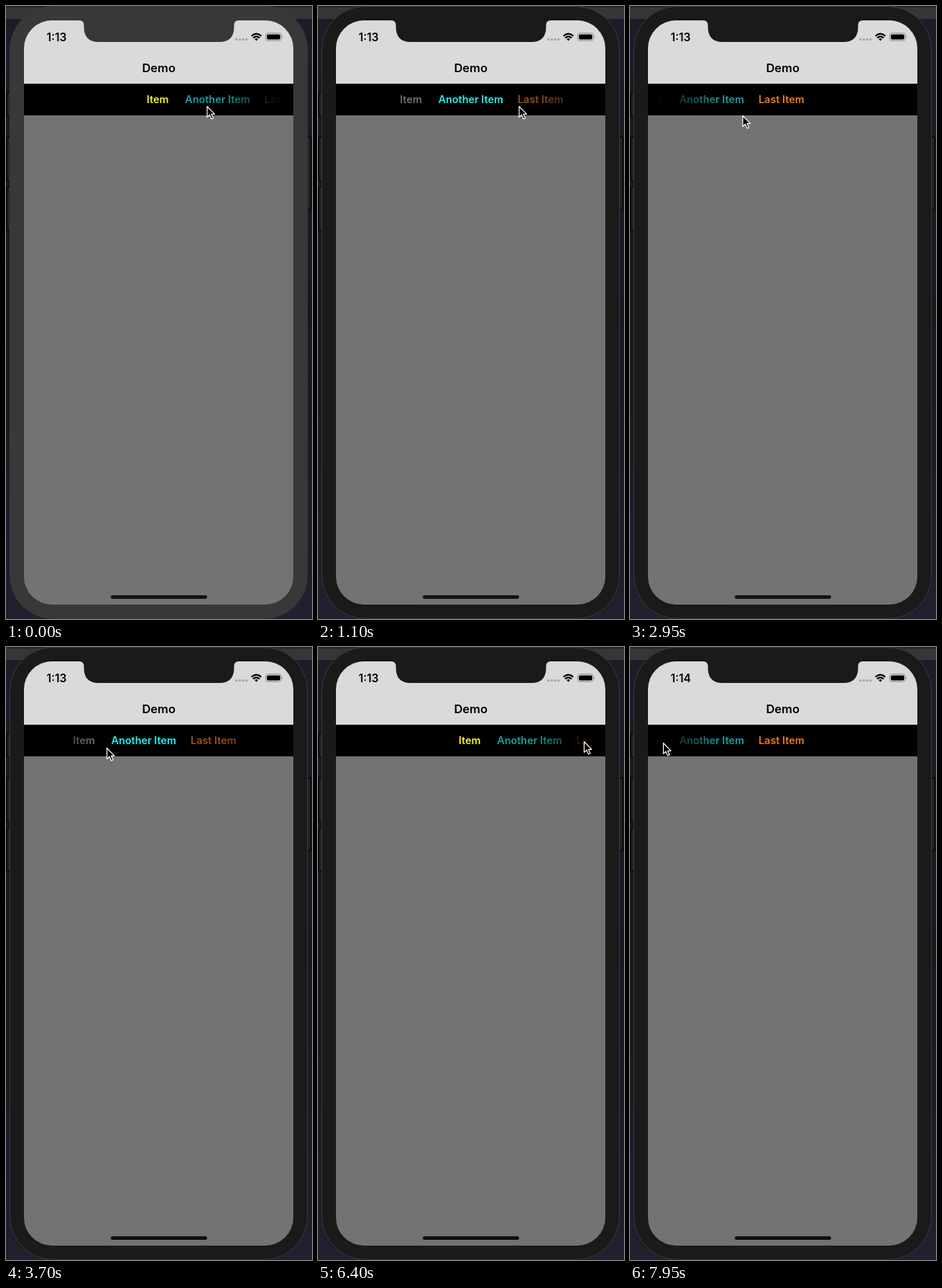
Write an HTML page that moves like this. It is 426 by 852 pixels and loops after 8 s.

```html
<!DOCTYPE html>
<html lang="en">
<head>
<meta charset="utf-8">
<title>Scrolling tab bar</title>
<style>
  html, body { margin: 0; width: 100%; height: 100%; overflow: hidden; background: #1c1c27; }
  svg { display: block; width: 100vw; height: 100vh; }
  text { font-family: Inter, Roboto, sans-serif; font-weight: 600; }
  .tab { font-size: 14.4px; }
</style>
</head>
<body>
<svg viewBox="0 0 426 852">
  <defs>
    <linearGradient id="desk" x2="0" y2="1">
      <stop offset="0" stop-color="#1d1d2a"/>
      <stop offset=".5" stop-color="#171720"/>
      <stop offset="1" stop-color="#20202e"/>
    </linearGradient>
    <linearGradient id="fade" gradientUnits="userSpaceOnUse" x1="38" x2="388" y1="0" y2="0">
      <stop offset="0" stop-color="#fff" stop-opacity="0"/>
      <stop offset=".25" stop-color="#fff"/>
      <stop offset=".75" stop-color="#fff"/>
      <stop offset="1" stop-color="#fff" stop-opacity="0"/>
    </linearGradient>
    <mask id="edges" maskUnits="userSpaceOnUse" x="25" y="108" width="375" height="44">
      <rect x="25" y="108" width="375" height="44" fill="url(#fade)"/>
    </mask>
    <clipPath id="screen"><rect x="25" y="20" width="375" height="812" rx="39"/></clipPath>
  </defs>

  <rect width="426" height="852" fill="url(#desk)"/>
  <rect width="426" height="18" fill="#363636"/>
  <rect width="426" height="1.2" y=".6" fill="#1a1a1a"/>

  <g fill="#232323" stroke="#050505" stroke-width="1.5">
    <rect x="1" y="119.5" width="8" height="34" rx="2"/>
    <rect x="1" y="182" width="8" height="61" rx="2"/>
    <rect x="1" y="251" width="8" height="61" rx="2"/>
    <rect x="416" y="182" width="8.5" height="101" rx="2"/>
  </g>
  <rect class="shell" x="5.5" y=".5" width="414" height="851" rx="60" stroke="#3b3b3b"/>

  <g clip-path="url(#screen)">
    <rect x="25" y="20" width="375" height="812" fill="#737373"/>
    <rect x="25" y="20" width="375" height="88" fill="#dadada"/>
    <rect x="25" y="108" width="375" height="44"/>
    <g mask="url(#edges)"><g id="tabs"></g></g>
  </g>
  <path class="shell" d="M102 19V20Q108.500 20 108.500 27V29Q108.500 50 129 50H297Q317.500 50 317.500 29V27Q317.500 20 324 20V19Z"/>
  <rect x="146" y="819" width="134" height="5" rx="2.500" fill="#111"/>

  <text id="clock" x="56.500" y="48.600" font-size="15.500"></text>
  <text x="212.700" y="92" font-size="16.500" text-anchor="middle">Demo</text>
  <g fill="#a9a9a9">
    <circle cx="320.800" cy="46.500" r="1.800"/><circle cx="325.600" cy="46.500" r="1.800"/>
    <circle cx="330.400" cy="46.500" r="1.800"/><circle cx="335.200" cy="46.500" r="1.800"/>
  </g>
  <g fill="none" stroke="#000" stroke-width="2.200">
    <path d="M341.700 41.700Q348.600 35.500 355.500 41.700"/>
    <path d="M344.100 44.300Q348.600 40.400 353.100 44.300"/>
  </g>
  <path d="M346.200 46Q348.600 44 351 46L348.600 48.500Z"/>
  <rect x="361.500" y="37.800" width="22" height="10.400" rx="3" fill="none" stroke="#8c8c8c"/>
  <rect x="363.200" y="39.500" width="18.600" height="7" rx="1.700"/>
  <path d="M384.700 41.200Q386.500 43 384.700 44.800Z" fill="#8c8c8c"/>

  <g id="pointer">
    <g id="ring" fill="none">
      <circle r="21" stroke="#000" stroke-width="3"/>
      <circle r="22.600" stroke="#666" stroke-width=".6"/>
    </g>
    <path d="M.5 .5V15.500L4 12.200L6.600 18L9 17L6.500 11.300H11Z" stroke="#fff" stroke-width="1.200" stroke-linejoin="round"/>
  </g>
</svg>
<script>
const LOOP = 8000, SCROLL_MS = 300, PRESS_MS = 95, ACTIVATE = 50, MINUTE = 7550;
const $ = id => document.getElementById(id);

const items = [
  { label: 'Item', x: -1.2, on: '#f4f42a', off: '#747474' },
  { label: 'Another Item', x: 52.2, on: '#1ef4f2', off: '#18a0a0' },
  { label: 'Last Item', x: 162.7, on: '#ee7a1c', off: '#9a4f16' }
];
const restX = [197, 115.3, 16.3];

// Each tap: press time, scroll start, chosen item
const taps = [[50, 200, 1], [1660, 1800, 2], [3340, 3490, 1], [4585, 4735, 0], [6290, 6440, 2]];

// Pointer stops: time, x, y
const stops = [
  [0, 279.5, 139], [2550, 279.5, 139], [2950, 156.5, 152], [3250, 140, 142],
  [3700, 140, 140], [4600, 139, 140], [4900, 139, 138], [5100, 139, 139],
  [5500, 250, 145], [5900, 371, 133], [6300, 371, 133], [6400, 370, 131],
  [6650, 370, 133], [7100, 225, 149], [7550, 60, 145], [7950, 46, 133], [8000, 46, 133]
];

const mix = (a, b, k) => a + (b - a) * k;
const ease = k => k * k * (3 - 2 * k);

for (const item of items) {
  const el = document.createElementNS('http://www.w3.org/2000/svg', 'text');
  el.textContent = item.label;
  el.setAttribute('class', 'tab');
  el.setAttribute('x', item.x);
  el.setAttribute('y', 135.4);
  item.el = $('tabs').appendChild(el);
}

function scrollAt(t) {
  let selected = 0, x = restX[0];
  for (const [, start, next] of taps) {
    if (t < start) break;
    const k = Math.min(1, (t - start) / SCROLL_MS);
    x = mix(restX[selected], restX[next], ease(k));
    selected = next;
  }
  return { x, selected };
}

function pointerAt(t) {
  const i = stops.findIndex(s => s[0] > t);
  const a = stops[i - 1], b = stops[i];
  const k = ease((t - a[0]) / (b[0] - a[0]));
  return [mix(a[1], b[1], k), mix(a[2], b[2], k)];
}

function draw(t) {
  const { x, selected } = scrollAt(t);
  $('tabs').setAttribute('transform', `translate(${x} 0)`);
  items.forEach((item, i) => item.el.setAttribute('fill', i === selected ? item.on : item.off));
  $('pointer').setAttribute('transform', `translate(${pointerAt(t)})`);
  const pressed = taps.some(([down]) => t >= down && t < down + PRESS_MS);
  $('ring').setAttribute('visibility', pressed ? 'visible' : 'hidden');
  $('clock').textContent = t < MINUTE ? '1:13' : '1:14';
  for (const el of document.querySelectorAll('.shell'))
    el.setAttribute('fill', t < ACTIVATE ? '#383838' : '#1a1a1a');
}

const origin = performance.now();
function tick() {
  draw((performance.now() - origin) % LOOP);
  requestAnimationFrame(tick);
}
tick();
</script>
</body>
</html>
```
